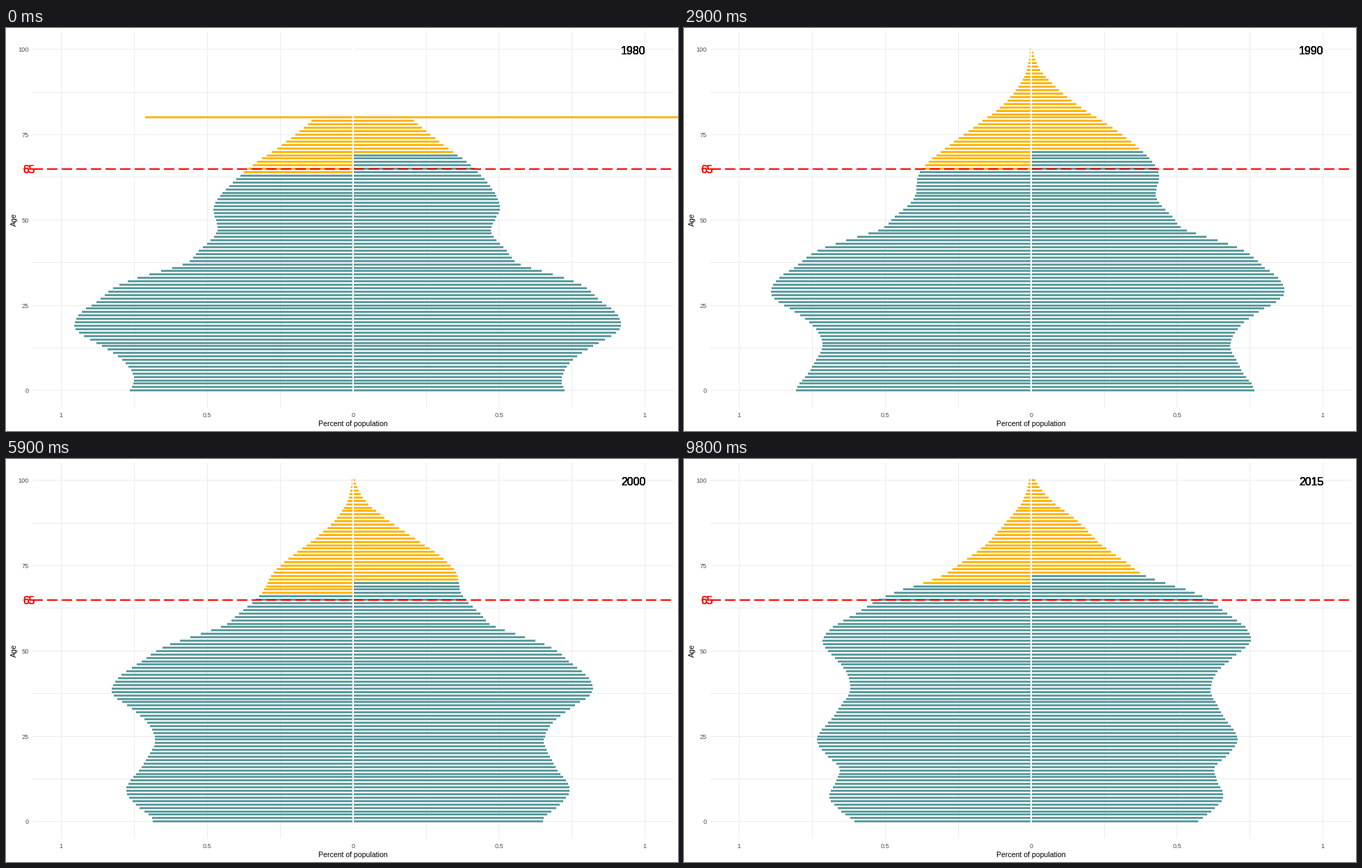
Animation of 966 by 580 pixels, one loop 10 s. Source, as a matplotlib script:

```python
import numpy as np
import matplotlib.pyplot as plt
from matplotlib.animation import FuncAnimation
from matplotlib.collections import PolyCollection
from matplotlib.patches import Rectangle

W, H, DPI = 966, 580, 100
MID, AGE0_Y, AGE_STEP = 498, 521.8, 4.91
TEAL, GOLD, GRID = "#5F9EA0", "#FFB70A", "#EBEBEB"
AGES = np.arange(101)
OPEN_AGE, SPLIT_YEAR = 80, 1988  # one open group 80+ before this year
REF_YEAR = 1997

# Relative size of birth cohorts: birth year, bar length in pixels.
COHORTS = np.array([
    (1888, 110), (1906, 138), (1916, 172), (1926, 191), (1934, 180),
    (1939, 200), (1943, 220), (1945, 248), (1948, 291), (1954, 332),
    (1958, 356), (1962, 361), (1967, 328), (1970, 308), (1976, 290),
    (1983, 305), (1992, 328), (1996, 309), (1999, 291), (2003, 293),
    (2008, 301), (2012, 281), (2015, 260)], float)


def spline(x, knots, vals):
    """Cubic Hermite curve through the knots."""
    slope = np.gradient(vals, knots)
    i = np.clip(np.searchsorted(knots, x, side="right") - 1, 0, len(knots) - 2)
    h = knots[i + 1] - knots[i]
    t = (np.maximum(x, knots[0]) - knots[i]) / h
    return ((1 + 2 * t) * (1 - t) ** 2 * vals[i] + t * (1 - t) ** 2 * h * slope[i]
            + t * t * (3 - 2 * t) * vals[i + 1] + t * t * (t - 1) * h * slope[i + 1])


def bar_lengths(year):
    """Male and female bars: cohorts age, shrink in share and die off."""
    birth, since = year - AGES, year - REF_YEAR
    dilution = (0.0035 + 0.000085 * (1992 - birth)) * since
    mortality = 0.00102 * np.exp(0.085 * AGES - 0.008 * since)
    men = spline(birth, *COHORTS.T) * np.exp(-dilution - mortality)
    women = men * 0.95 * np.exp(0.0059 * np.exp(0.055 * AGES))
    if year < SPLIT_YEAR:
        men, women = men[:OPEN_AGE + 1], women[:OPEN_AGE + 1]
        men[-1] = 298 + 11.7 * (year - 1980)
        women[-1] = 2 * men[-1]
    return [np.maximum(np.round(p), 1) for p in (men, women)]


def gold_from(year):
    """First gold age for men and women, rising with life expectancy."""
    return int(64.1 + 0.17 * (year - 1980)), int(70.5 + 0.072 * (year - 1980))


def pyramid(year):
    verts, colors = [], []
    for sign, sizes, start in zip((-1, 1), bar_lengths(year), gold_from(year)):
        for age, n in enumerate(sizes):
            top = round(AGE0_Y - AGE_STEP * age - 1.5)
            x = MID + sign * n
            verts.append([(MID, top), (x, top), (x, top + 3), (MID, top + 3)])
            colors.append(GOLD if age >= start else TEAL)
    return verts, colors


def year_at(ms):
    if ms < 200:
        return 1980
    if ms < 8600:
        return 1981 + (ms - 200) // 300
    return 2009 + (ms - 8600) // 200


fig = plt.figure(figsize=(W / DPI, H / DPI), dpi=DPI, facecolor="white")
ax = fig.add_axes([0, 0, 1, 1])
ax.set_xlim(0, W)
ax.set_ylim(H, 0)
ax.axis("off")


def box(x, y, w, h, color, z):
    ax.add_patch(Rectangle((x, y), w, h, fc=color, lw=0, aa=False, zorder=z))


def label(x, y, s, px, color="black", **kw):
    kw = {"ha": "center", "va": "baseline", **kw}
    return ax.text(x, y, s, fontsize=px * 72 / DPI, color=color,
                   family="Liberation Sans", zorder=6, **kw)


for k in range(9):
    box(round(79 + 104.9 * k), 5, 1, 541, GRID, 1)
    box(38, int(AGE0_Y - AGE_STEP * 12.5 * k), 922, 1, GRID, 1)
for k, s in enumerate(("1", "0.5", "0", "0.5", "1")):
    label(79.3 + 209.75 * k, 559.5, s, 9.2, "#4D4D4D")
for age in range(0, 101, 25):
    label(33, AGE0_Y - AGE_STEP * age + 3.5, str(age), 9.2, "#4D4D4D", ha="right")
label(498.5, 573, "Percent of population", 10.5)
label(11.5, 276, "Age", 10.5, rotation=90, va="center")

bars = PolyCollection([], linewidths=0, antialiaseds=False, zorder=2)
ax.add_collection(bars, autolim=False)
box(MID, 5, 2, 541, "white", 3)
ax.plot([38, 960], [203, 203], color="red", lw=2 * 72 / DPI, dashes=(7, 3),
        dash_capstyle="butt", aa=False, zorder=4)

# Stacked copies give the heavy edges of overprinted text.
for _ in range(5):
    label(33, 209, "65", 15.5, "red")
years = [label(901.7, 38, "", 16) for _ in range(5)]


def draw(i):
    year = year_at(i * 100)
    verts, colors = pyramid(year)
    bars.set_verts(verts)
    bars.set_facecolor(colors)
    for t in years:
        t.set_text(str(year))
    return [bars, *years]


anim = FuncAnimation(fig, draw, frames=100, interval=100, repeat=True,
                     repeat_delay=0, blit=False)
plt.show()
```
